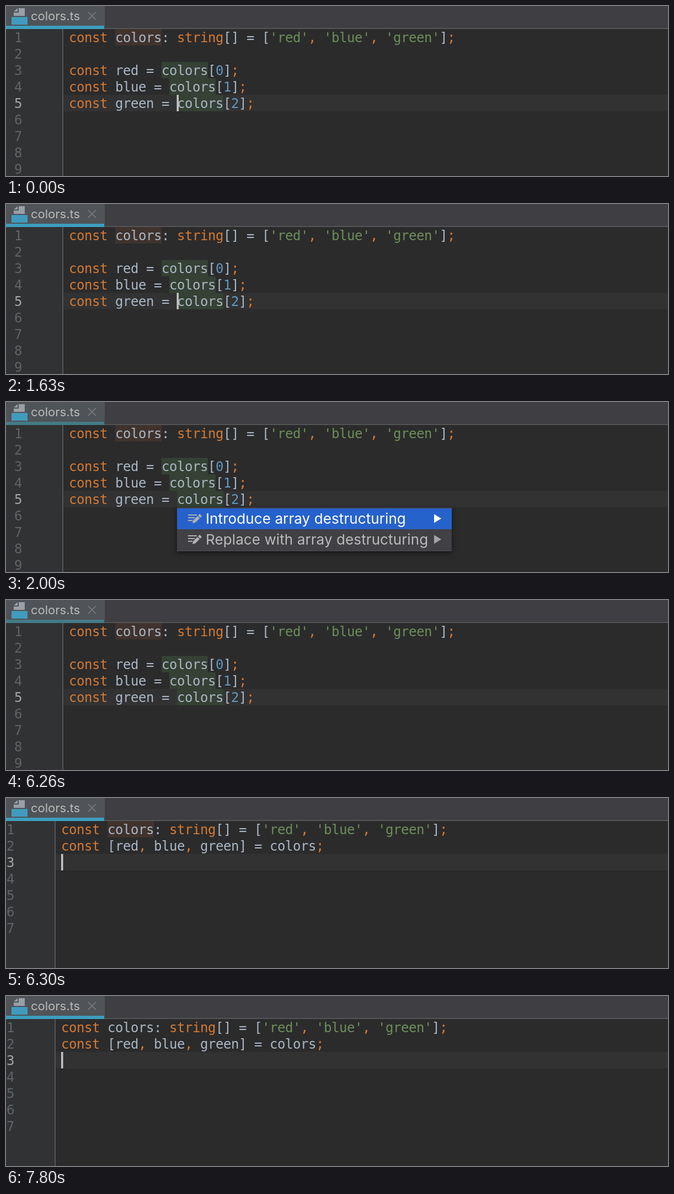
Recreate the animation shown at these times as an HTML page. Size 1200 px wide and 310 px high, loop 8.13 s.

```html
<!DOCTYPE html>
<html lang="en">
<meta charset="utf-8">
<title>Array destructuring</title>
<style>
  html, body { margin: 0; width: 100%; height: 100%; overflow: hidden; background: #2b2b2c; }
  svg { display: block; }
  text { white-space: pre; }
  .code text { font: 24px "DejaVu Sans Mono", monospace; letter-spacing: -.45px; fill: #abb7c5; }
  .code .num { fill: #606366; }
  .code .current { fill: #a6a6a6; }
  .key { fill: #d47a33; }
  .str { fill: #6c8f59; }
  .val { fill: #6398bd; }
  .ui { font-family: Inter, sans-serif; }
  .item { font-size: 26px; letter-spacing: .1px; fill: #bbb; color: #a5a5a7; }
  .item.on { fill: #fff; color: #fff; }
  .item rect { fill: none; }
  .item.on rect { fill: #2662cb; }
  .item .arrow { fill: currentColor; }
  .shadow { filter: drop-shadow(0 3px 5px #0008); }
</style>
<svg width="1200" height="310" viewBox="0 0 1200 310">
  <g id="before" class="code"></g>
  <g id="after" class="code" transform="translate(-14)"></g>

  <rect width="1200" height="41" fill="#3f3e43"/>
  <rect y="40" width="1200" height="2" fill="#555557"/>
  <rect width="179" height="37" fill="#505357"/>
  <rect id="underline" y="36" width="178" height="6"/>
  <path d="M23 4H34V18H14V12H23ZM14 10 21 4V10Z" fill="#9aa1a6"/>
  <rect x="10" y="20" width="29" height="14" fill="#409bbd"/>
  <text class="ui" x="45" y="26" font-size="22" fill="#bbb">colors.ts</text>
  <path d="M149 11 163 25M163 11 149 25" stroke="#7b7e82" stroke-width="1.6"/>

  <g id="menu" class="ui">
    <rect class="shadow" x="310" y="192" width="498" height="80" fill="#404045"/>
    <path d="M310 271.5H808" stroke="#515155"/>
  </g>
</svg>
<script>
const LOOP = 8130;
const $ = id => document.getElementById(id);
const add = (parent, html) => parent.insertAdjacentHTML('beforeend', html);
const show = (el, on) => el.style.display = on ? '' : 'none';
const within = (t, a, b) => t >= a && t < b;

const paint = line => line.replace(/('\w+')|(const|string|[,;])|(\d)/g, (s, str, key) =>
  `<tspan class="${str ? 'str' : key ? 'key' : 'val'}">${s}</tspan>`);

const rowTop = row => 42 + 30 * row;
const colLeft = col => 114 + 14 * col;

// marks: [row, column, colour] behind each highlighted "colors"
function editor(id, lines, count, current, caretX, marks) {
  const g = $(id), y = rowTop(current);
  add(g, `<rect y="42" width="103" height="268" fill="#313234"/>
    <rect x="104" y="${y}" width="1120" height="30" fill="#323233"/>
    <rect x="102" y="42" width="2" height="268" fill="#555557"/>`);
  for (const [row, col, fill] of marks)
    add(g, `<rect class="mark" x="${colLeft(col)}" y="${rowTop(row)}" width="84" height="30" fill="${fill}"/>`);
  for (let i = 0; i < count; i++)
    add(g, `<text class="num ${i === current ? 'current' : ''}" x="15" y="${rowTop(i) + 24}">${i + 1}</text>
      <text x="114" y="${rowTop(i) + 24}">${paint(lines[i] || '')}</text>`);
  add(g, `<rect class="caret" x="${caretX}" y="${y}" width="3.5" height="30" fill="#c4c4c4"/>`);
}

const declaration = "const colors: string[] = ['red', 'blue', 'green'];";
const WRITE = '#40332d', READ = '#344134';
editor('before', [declaration, '', 'const red = colors[0];', 'const blue = colors[1];', 'const green = colors[2];'],
  9, 4, 309.5, [[0, 6, WRITE], [2, 12, READ], [3, 13, READ], [4, 14, READ]]);
editor('after', [declaration, 'const [red, blue, green] = colors;'], 7, 2, 114, [[0, 6, WRITE]]);

['Introduce', 'Replace with'].forEach((verb, i) => add($('menu'),
  `<g class="item" transform="translate(310 ${194 + 38 * i})">
    <rect width="498" height="38"/>
    <path d="M20 12H36M20 17H32M20 22H28" stroke="#b0b1b3" stroke-width="2"/>
    <path d="M28 27 29 22 37 14 41 18 33 26ZM38 13 41 10 45 14 42 17Z" fill="#b0b1b3"/>
    <text x="52" y="28">${verb} array destructuring</text>
    <path class="arrow" d="M466 10.5 479 18.5 466 26.5Z"/>
  </g>`));

const items = document.querySelectorAll('.item');
const [caretBefore, caretAfter] = document.querySelectorAll('.caret');
const markAfter = document.querySelector('#after .mark');

function draw(now) {
  const t = now % LOOP, done = t >= 6300, menu = within(t, 2000, 6260);
  show($('before'), !done);
  show($('after'), done);
  show($('menu'), menu);
  show(caretBefore, t < 130 || within(t, 630, 1130) || within(t, 1630, 2000));
  show(caretAfter, !within(t, 7300, 7800));
  show(markAfter, t < 6600);
  items[0].classList.toggle('on', t < 3760);
  items[1].classList.toggle('on', t >= 3760);
  $('underline').setAttribute('fill', within(t, 2000, 6300) ? '#437b86' : '#3d9ebf');
}

const start = performance.now();
function tick() {
  draw(performance.now() - start);
  requestAnimationFrame(tick);
}
tick();
</script>
</html>
```
